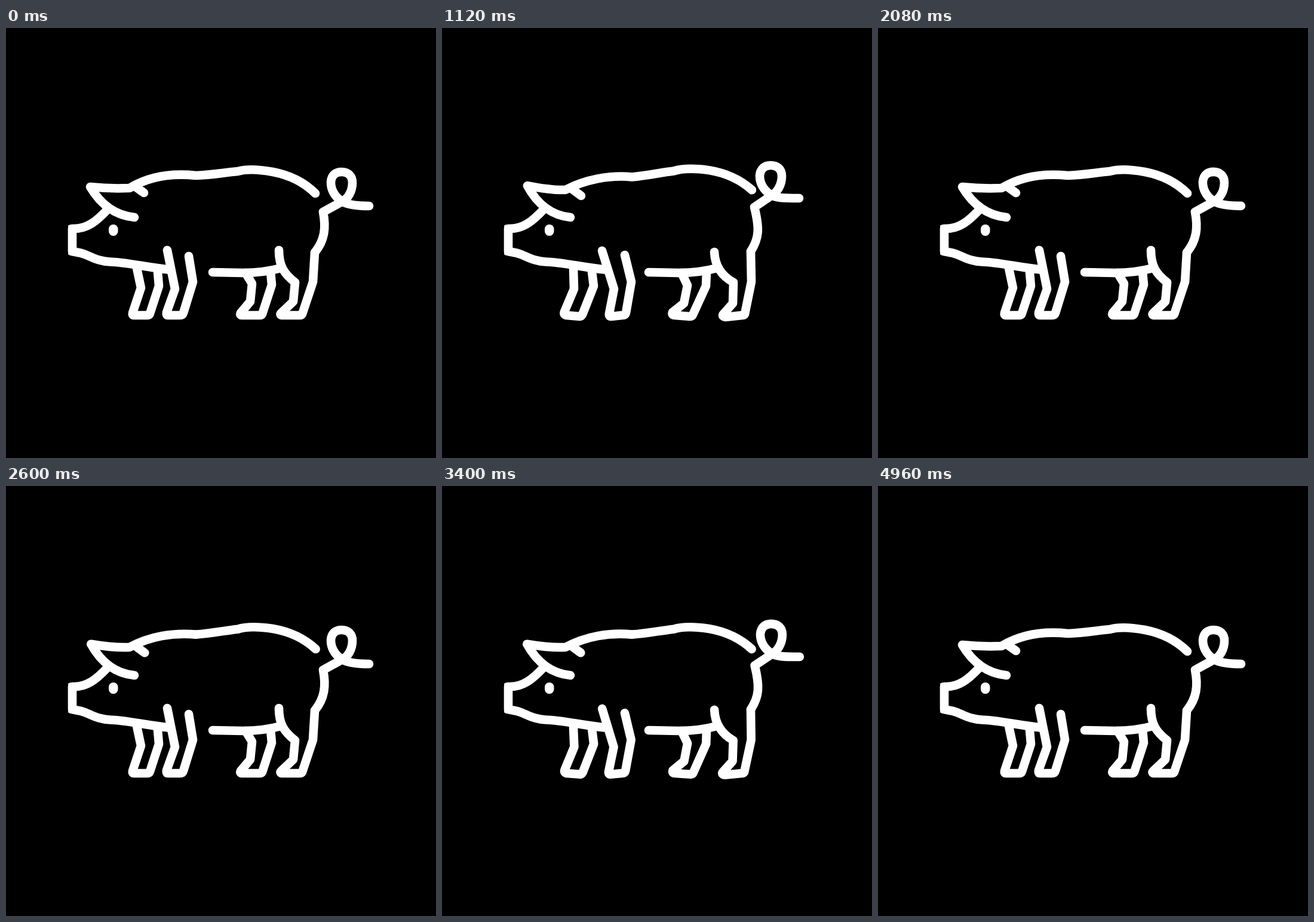
These frames come from a looping animation (720x720 px, 5000 ms). An HTML page with a canvas:

```html
<!DOCTYPE html>
<html lang="en">
<head>
<meta charset="utf-8">
<title>Pig</title>
<style>
  html, body { margin: 0; width: 100%; height: 100%; overflow: hidden; background: #000; }
  canvas { display: block; width: 100vw; height: 100vh; }
</style>
</head>
<body>
<canvas id="stage" width="720" height="720"></canvas>
<script>
const ctx = document.getElementById("stage").getContext("2d");
const LOOP = 5000;

const still = [
  // snout and jaw
  "M170 304 C152 323 136 337 111 336 L111 374 L126 377 C142 382 154 391 174 391.5 C200 392 232 400 272 404.5",
  // belly
  "M346 409 L396 410 C420 410 442 407 460 402"
].map(d => new Path2D(d));

// Each part is a resting path and a fully moved path with the same commands.
const back = [
  ["M215 317 C185 314 160 298 141 266 C160 268 185 269 207 268 C240 248 280 243 318 247 C345 246 366 242 388 240 C402 236 425 237 447 241 C478 247 500 259 518 277",
   "M215 317 C185 314 160 296 143 264 C163 268 185 272 207 271 C240 254 280 246 318 249.5 C345 247 366 242 388 239.5 C402 235 425 235 447 238 C478 243 501 255 519 271"],
  ["M217 266 L231 276", "M218 270 L233 281"]
];

const limbs = [
  // tail and rump
  ["M608 298 C582 298 570 295 562 290 C549 281 544 269 544 258 C545 246 552 241 562 241 C573 241 580 248 580 259 C580 273 573 286 562 291 L531 308 C536 334 534 355 517 376",
   "M598 285 C572 285 559 285 550 279 C537 270 532 259 532 247 C533 236 540 230 550 230 C561 230 569 236 569 248 C569 262 562 275 551 281 L523 300 C532 336 531 352 517 374"],
  // near hind leg
  ["M517 376 L514 425 L496 479 Q495 481 492 481 L464 481 Q457 481 461 477 L481 458 L484 426 C465 411 457 398 457 372",
   "M517 374 L518 425 L507 479 Q506 481 503 481 L475 484 Q467 483 472 478 L487 461 L488 426 C468 415 457 398 456 375"],
  // far hind leg
  ["M401 410 L412 428 L409 458 L393 477 Q391 481 395 481 L425 481 Q428 481 429 479 L445 430 L443 408",
   "M401 410 L411 431 L405 461 L386 476 Q384 481 390 481 L415 483 Q419 483 420 480 L442 432 L443 408"],
  // near foreleg
  ["M270 372 L283 437 L269 476 Q268 481 271 481 L291 481 Q296 481 297 477 L313 425 L306 382",
   "M268 373 L288 437 L280 478 Q279 483 283 483 L302 481 Q307 481 308 477 L317 425 L306 380"],
  // far foreleg
  ["M219 402 L226 435 L212 477 Q211 481 214 481 L237 481 Q240 481 241 478 L256 432 L254 408",
   "M220 402 L221 437 L205 475 Q203 480 208 481 L231 483 Q233 483 235 480 L254 432 L251 408"]
];

const ease = x => (1 - Math.cos(Math.PI * Math.min(1, Math.max(0, x)))) / 2;
const ramp = (t, from, to) => ease((t - from) / (to - from));

function morph([rest, moved], k) {
  const ends = moved.match(/[\d.]+/g);
  let i = 0;
  return new Path2D(rest.replace(/[\d.]+/g, n => (+n + (ends[i++] - n) * k).toFixed(3)));
}

function draw(t) {
  const breath = t < 4000 ? (1 - Math.cos(Math.PI * t / 1000)) / 2 : 0;
  const sway = ramp(t, 0, 1010) - ramp(t, 1130, 2150)
             + ramp(t, 2640, 3570) - ramp(t, 3590, 4500);

  ctx.fillStyle = "#000";
  ctx.fillRect(0, 0, 720, 720);
  ctx.strokeStyle = ctx.fillStyle = "#fff";
  ctx.lineWidth = 14.6;
  ctx.lineCap = ctx.lineJoin = "round";

  still.forEach(path => ctx.stroke(path));
  back.forEach(part => ctx.stroke(morph(part, breath)));
  limbs.forEach(part => ctx.stroke(morph(part, sway)));

  // squared corners of the snout
  ctx.beginPath();
  ctx.roundRect(104, 329.5, 14, 51, 3);
  ctx.fill();

  // eye
  ctx.beginPath();
  ctx.roundRect(172, 329, 15.5, 19, 7.5);
  ctx.fill();
}

function tick() {
  draw(performance.now() % LOOP);
  requestAnimationFrame(tick);
}
tick();
</script>
</body>
</html>
```
